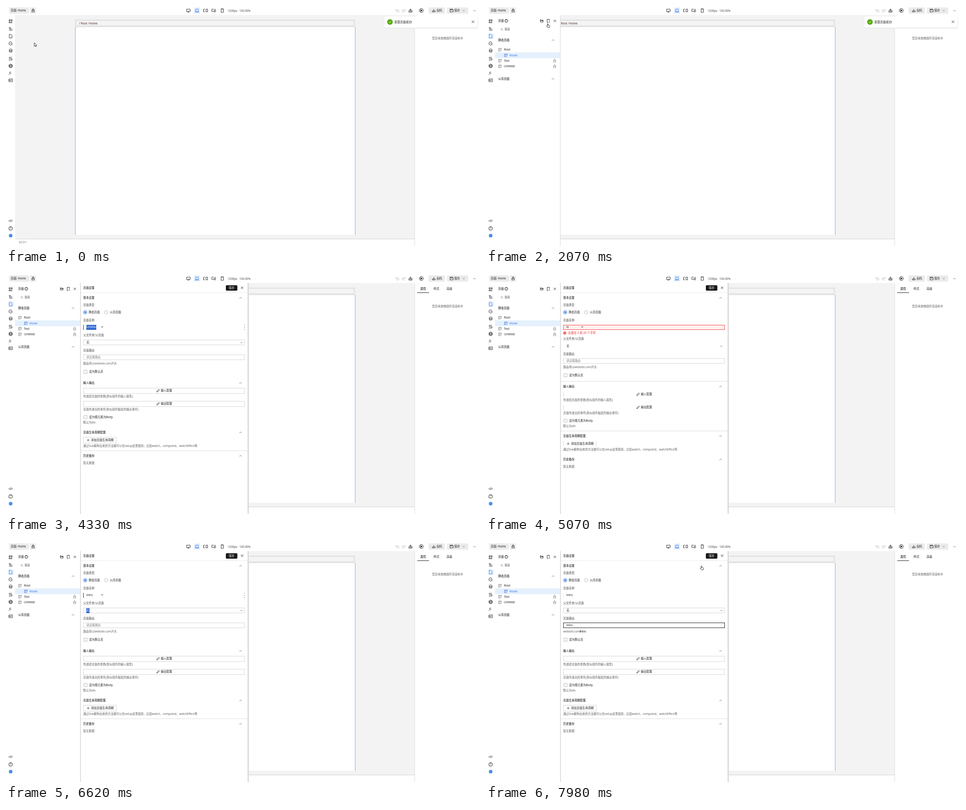
An HTML page for the animation above (8 s loop, 1050 px wide and 533 px high).

```html
<!DOCTYPE html>
<html>
<head>
<meta charset="utf-8">
<title>Page settings</title>
<style>
html, body { margin: 0; width: 100%; height: 100%; overflow: hidden; background: #fff; }
svg { display: block; width: 1050px; height: 533px; }
text { font: 6.25px "Noto Sans", "Noto Sans CJK SC", "Noto Sans CJK", sans-serif; white-space: pre; }
rect, .rule { shape-rendering: crispEdges; }
.round { shape-rendering: auto; }
.shifted .soft { stroke: none; }
.shifted .resting, :not(.shifted) > .moved { display: none; }
</style>
</head>
<body>
<script>
const NS = 'http://www.w3.org/2000/svg';
const INK = '#1c1c1c', BLUE = '#2f74e8', PALE = '#e5f0fd', LINE = '#d6d6d6', MUTED = '#444', HINT = '#5c5c5c',
  RED = '#f24a4a', SELECT = '#2c66cf';

function el(parent, tag, attrs = {}, content) {
  const node = document.createElementNS(NS, tag);
  for (const key in attrs) node.setAttribute(key, attrs[key]);
  if (content) node.textContent = content;
  return parent.appendChild(node);
}
const group = parent => el(parent, 'g');
const rect = (p, x, y, width, height, fill, more) => el(p, 'rect', { x, y, width, height, fill, ...more });
const pill = (p, x, y, w, h, fill, rx = 2) => rect(p, x, y, w, h, fill, { rx, class: 'round' });
const circle = (p, cx, cy, r, fill, stroke = 'none') => el(p, 'circle', { cx, cy, r, fill, stroke });
// y is the middle of the line of text
const label = (p, x, y, content, fill = INK, weight = 400) =>
  el(p, 'text', { x, y: y + 2.3, fill, 'font-weight': weight }, content);
const title = (p, x, y, content) => label(p, x, y, content, '#000', 700);
const icon = (p, x, y, d, stroke = INK, fill = 'none') =>
  el(p, 'path', { d, stroke, fill, 'stroke-width': 0.9, transform: `translate(${x} ${y})` });
const frame = (p, x, y, w, h, stroke = LINE) =>
  rect(p, x + .5, y + .5, w, h, '#fff', { stroke, rx: 1, class: 'soft' });
const edge = (p, x, y, stroke, dash = 'none') =>
  el(p, 'path', { d: `M${x + .5} ${y}v11`, stroke, 'stroke-dasharray': dash, class: 'rule' });
const show = (node, on) => node.setAttribute('visibility', on ? 'visible' : 'hidden');

const PAGE = 'M-3-4h4l2 2v6h-6z', UP = 'M-2.5 1.2L0-1.3 2.5 1.2', DOWN = 'M-2.5-1.2L0 1.3 2.5-1.2',
  CROSS = 'M-2.5-2.5l5 5M2.5-2.5l-5 5', LOCK = 'M-2.5-.5h5v3.5h-5zM-1.5-.5v-1.5a1.5 1.5 0 0 1 3 0v1.5',
  SCREEN = 'M-4-3h8v5h-8zM-2 3.5h4', NOTE = 'M-3-3h6v4l-2 2h-4zM-1.5-1h3M-1.5 1h1.5',
  DISK = 'M-3.5-3h6l1 1v5h-7zM-1.5-3v2h3v-2', PENCIL = 'M-3 3l.5-2L1.5-3 3-1.5-1 2.5z';

const svg = el(document.body, 'svg', { viewBox: '0 0 1050 533' });

function drawCanvas(p) {
  rect(p, 0, 0, 1050, 533, '#fff');
  rect(p, 20, 20, 885, 498, '#f3f3f3');
  rect(p, 153, 30, 620, 17, '#e4e4e4');
  pill(p, 156, 33, 614, 10, '#f4f4f4', 3);
  [[162, '/'], [166, 'Root'], [181.5, '/'], [185, 'Home']].forEach(([x, s]) => label(p, x, 38.5, s, '#4a2222'));
  rect(p, 153, 47, 620, 461, '#fff');
  el(p, 'path', { d: 'M153.5 47V508M773.5 47V508', stroke: '#3c86f2', 'stroke-dasharray': '2 1', class: 'rule' });
  rect(p, 20, 517, 885, 1, '#d4d4d4');
  label(p, 28.5, 525, 'BODY', '#888');
}

function drawToolbar(p) {
  pill(p, 7, 3, 44, 14, '#ebebeb');
  label(p, 10.5, 10, '页面: Home');
  pill(p, 53, 3, 13.5, 14, '#ebebeb');
  icon(p, 60, 10, LOCK);
  pill(p, 416, 3, 14, 14, PALE);
  icon(p, 404, 10, SCREEN);
  icon(p, 423, 10, 'M-3-3h6v5h-6zM-4.5 3.5h9', BLUE);
  icon(p, 442, 10, 'M-1.5-3h-3v6h3M1-3h3.5v6H1z');
  icon(p, 460, 10, 'M0-3h-4v5h4M1-1h3v4H1zM2-3h2');
  icon(p, 479, 10, 'M-2.5-4h5v8h-5zM-1-2.5h2');
  label(p, 491, 10.5, '1200px', MUTED);
  label(p, 517, 10.5, '100.00%', MUTED);
  icon(p, 867, 10, 'M-2-3l-2 2 2 2M-4-1h7v4h-6', '#bbb');
  icon(p, 881, 10, 'M2-3l2 2-2 2M4-1h-7v4h6', '#bbb');
  icon(p, 896, 10, 'M-3.5 0h7v3.5h-7zM-1 0v-3h2v3M-1 3.5v-2M1 3.5v-2');
  circle(p, 920, 10, 4.3, 'none', INK);
  icon(p, 920, 10, 'M-1.3-2L2 0-1.3 2z', INK, INK);
  pill(p, 936, 3, 36, 14, '#ebebeb');
  icon(p, 947.5, 10, 'M-3 0v3h6V0M0-3v4M-1.5 0L0 1.5 1.5 0');
  label(p, 953.5, 10, '出码');
  pill(p, 977, 3, 47, 14, '#ebebeb');
  icon(p, 987, 10, DISK);
  label(p, 993, 10, '保存');
  icon(p, 1014, 10, DOWN, '#777');
  [-2, 0, 2].forEach(dx => circle(p, 1038 + dx, 10.5, .6, INK));
}

function drawRail(p) {
  const cylinder = 'M-3-2.5c0-1.5 6-1.5 6 0v5c0 1.5-6 1.5-6 0zM-3-1c2 1 4 1 6 0M-3 1c2 1 4 1 6 0';
  [[34, 'M-3.5-3.5h2.5v2.5h-2.5zM1-3.5h2.5v2.5H1zM-3.5 1h2.5v2.5h-2.5zM3.5 1H1v2.5h2.5'],
   [51, 'M-4-3h5M-2 0h6M-2 3h6M-2-3v6'], [67, PAGE],
   [83, 'M3-2L0-4l-3.5 2v4L0 4l3.5-2V0M-1 0h4'], [99, cylinder],
   [117, 'M-3-3h6M-3 0h6v3h-7M-3-3v3'],
   [133, 'M-4 0a4 4 0 1 0 8 0a4 4 0 1 0-8 0M-4 0h8M0-4c-2.5 2-2.5 6 0 8M0-4c2.5 2 2.5 6 0 8'],
   [165, 'M-4-3h8v6h-8zM-2.5 1V-1L-1 1l1.5-2L2 1'],
   [477, 'M-2-2l-2 2 2 2M2-2l2 2-2 2M.8-3l-1.6 6']].forEach(([y, d]) => icon(p, 10.3, y, d));
  label(p, 6.5, 149, 'JS', INK, 600);
  circle(p, 10.3, 494, 4, 'none', INK);
  label(p, 8.8, 494, '?');
  circle(p, 10.3, 510, 4, '#4a8df0');
}

function drawInspector(p) {
  rect(p, 905, 20, 1, 513, '#dedede');
  label(p, 918, 33, '属性', '#000', 600);
  label(p, 947, 33, '样式');
  label(p, 976, 33, '高级');
  rect(p, 911, 41, 26, 1, '#222');
  label(p, 944, 72, '您还未拖拽组件至画布中', HINT);
}

function drawToast(p) {
  pill(p, 837, 24, 209, 26, '#e9e9e9', 3);
  pill(p, 838, 23.5, 207, 24.5, '#fff', 2);
  circle(p, 850.5, 35.5, 6.2, '#55ad0c');
  icon(p, 850.5, 35.5, 'M-2.8 0l2 2 3.5-3.8', '#fff');
  label(p, 860.5, 36, '新建页面成功!');
  icon(p, 1034.5, 35, CROSS);
}

function drawPages(p) {
  pill(p, 5, 60.5, 12, 13, PALE);
  icon(p, 10.3, 67, PAGE, BLUE);
  rect(p, 20, 20, 145, 513, '#fff');
  rect(p, 164, 20, 1, 513, '#d8d8d8');
  title(p, 27, 33, '页面');
  circle(p, 45, 33, 3.3, 'none', INK);
  label(p, 43.6, 33, '?');
  icon(p, 123.5, 33, 'M-3-2.5h2l1 1h3v4h-6zM-3-.5h6');
  icon(p, 138, 33, 'M2.5 0v-3.5h-5v7H0M1 2.5h3');
  icon(p, 152.5, 33, CROSS);
  icon(p, 35, 51.5, 'M2 0a2 2 0 1 0-4 0a2 2 0 1 0 4 0M1.5 1.5L3 3', '#999');
  label(p, 41, 51.5, '搜索', HINT);
  [[76, '静态页面'], [162, '公共页面']].forEach(([y, s]) => {
    title(p, 27, y, s);
    icon(p, 148.5, y, UP, '#666');
  });
  rect(p, 20, 103, 144, 13, PALE);
  [[97, 'Root'], [121.5, 'Test', true], [134, 'Untitled', true]].forEach(([y, s, locked]) => {
    icon(p, 31, y, NOTE, '#777');
    label(p, 40, y, s);
    if (locked) icon(p, 152, y, LOCK, '#888');
  });
  icon(p, 44, 109.5, NOTE, BLUE);
  label(p, 52, 109.5, 'Home', BLUE);
}

function section(p, y, name) {
  title(p, 171, y, name);
  icon(p, 519.5, y, UP, '#666');
}
function checkbox(p, y, name) {
  frame(p, 172, y - 4, 7, 7, '#bbb').classList.remove('soft');
  label(p, 184, y, name);
}

function drawSettings(p) {
  rect(p, 165, 20, 370, 513, '#fff');
  rect(p, 164, 20, 2, 513, '#dedede');
  rect(p, 535, 20, 3, 513, '#dcdcdc');
  title(p, 171, 30.5, '页面设置');
  pill(p, 487, 25, 25.5, 12, '#191919');
  label(p, 493.5, 30.7, '保存', '#fff');
  icon(p, 523, 30.5, CROSS);
  rect(p, 165, 41, 370, 1, '#ececec');
  section(p, 53, '基本设置');
  label(p, 171, 69, '页面类型', MUTED);
  circle(p, 175.5, 85, 3.8, '#fff', BLUE);
  circle(p, 175.5, 85, 2, BLUE);
  label(p, 183, 85, '静态页面');
  circle(p, 222, 85, 3.8, '#fff', '#bbb');
  label(p, 230, 85, '公共页面');
  label(p, 171, 103, '页面名称', MUTED);
}

function drawLower(p) {
  label(p, 171, 136, '父文件夹/父页面', MUTED);
  frame(p, 171, 146, 357, 11);
  icon(p, 521.5, 152.3, DOWN, '#666');
  label(p, 171, 170, '页面路由', MUTED);
  checkbox(p, 217, '设为默认页');
  [[230, 'moved'], [340, 'moved'], [392, 'resting']].forEach(([y, name]) =>
    rect(p, 165, y, 370, 1, '#dedede', { class: name }));
  section(p, 242, '输入输出');
  [[259, '输入配置'], [288, '输出配置']].forEach(([y, s]) => {
    frame(p, 171, y - 6, 357, 12);
    edge(p, 171, y - 5, LINE);
    icon(p, 337, y, PENCIL);
    label(p, 343, y, s, INK, 500);
  });
  label(p, 171, 272, '传递给页面的参数(类似组件的输入属性)', HINT);
  label(p, 171, 301, '页面传递出的事件(类似组件触发的输出事件)', HINT);
  checkbox(p, 317.5, '设为根元素为Body');
  label(p, 171, 330, '默认为div', HINT);
  section(p, 352, '页面生命周期配置');
  frame(p, 171, 362, 73, 13);
  [171, 244].forEach(x => edge(p, x, 363, LINE));
  icon(p, 182, 369, 'M-3 0h6M0-3v6', '#555');
  label(p, 188.5, 369, '添加页面生命周期');
  label(p, 171, 382, '通过Vue解构出来的方法都可以在setup这里使用，比如watch、computed、watchEffect等', HINT);
  section(p, 404, '历史备份');
  label(p, 171, 419.5, '暂无数据', HINT);
}

drawCanvas(svg);
drawToolbar(svg);
rect(svg, 0, 20, 20, 513, '#fff');
drawRail(svg);
drawInspector(svg);
const pages = group(svg);
drawPages(pages);
const settings = group(svg);
drawSettings(settings);

const nameBox = rect(settings, 171.5, 113.5, 357, 10, '#fff0ee', { rx: 1, stroke: RED });
const nameEdges = [edge(settings, 171, 113, LINE), edge(settings, 528, 113, LINE, '1 4')];
const nameSelection = rect(settings, 178, 113, 13, 11, SELECT);
const nameText = label(settings, 178, 118, 'Untitled');
const caret = rect(settings, 184, 115, 1, 7, INK);

const error = group(settings);
circle(error, 174.5, 131, 3.2, RED);
icon(error, 174.5, 131, 'M-1.1-1.1l2.2 2.2M1.1-1.1l-2.2 2.2', '#fff');
label(error, 182, 131, '长度在 3 到 25 个字符', '#f02020');

const lower = group(settings);
drawLower(lower);
const parentSelection = rect(lower, 178, 147, 7, 11, SELECT);
const parentText = label(lower, 178.3, 152, '无');
const routeBox = frame(lower, 171, 179, 357, 11);
routeBox.classList.remove('soft');
const routeText = label(lower, 178, 185, '');
const routeHint = label(lower, 171, 199, '', HINT);
const routeSlug = label(lower, 207.5, 199, 'intro', '#000', 600);

const toast = group(svg);
drawToast(toast);

const clickSpot = circle(svg, 212, 113.5, 6, '#fff04a');
clickSpot.setAttribute('opacity', .85);
const pointer = group(svg);
const arrow = icon(pointer, 0, 0, 'M.5.5v8l2-1.6 1.3 2.4 1.2-.6-1.2-2.4 2.4-.3z', '#222', '#fff');
const hand = icon(pointer, 0, 0, 'M2 6V1q.8-1 1.6 0v3l3 .7q.9.3.7 1.5L6.5 9.5H3L.3 6q.5-1 1.7 0z', '#222', '#fff');
const dash = rect(pointer, -1, 2, 4, 1, INK);

const pointerPath = [[0, 62, 81], [840, 14, 66], [1040, 14, 66], [2000, 134, 38.5], [2300, 134, 38.5],
  [2540, 126, 51], [3100, 212, 115], [7330, 212, 115], [7980, 474.5, 52.5]];
const names = [[0, 'Untitled'], [4400, 'i'], [4540, 'in'], [5270, 'int'], [5340, 'intr'], [5410, 'intro']];

const clamp = v => Math.max(0, Math.min(1, v));
const ramp = (t, from, to) => clamp((t - from) / (to - from));
const within = (t, from, to) => t >= from && t < to;

function pointerAt(t) {
  const i = pointerPath.findIndex(key => key[0] > t);
  if (i < 0) return pointerPath[pointerPath.length - 1].slice(1);
  const [t0, x0, y0] = pointerPath[i - 1], [t1, x1, y1] = pointerPath[i];
  const k = ramp(t, t0, t1), e = k * k * (3 - 2 * k);
  return [x0 + (x1 - x0) * e, y0 + (y1 - y0) * e];
}

function render(t) {
  pages.style.display = t >= 970 ? '' : 'none';
  settings.style.display = t >= 2400 ? '' : 'none';
  show(toast, t < 3780);

  const invalid = within(t, 4400, 5270);
  const nameFocused = within(t, 3150, 6690);
  const nameSelected = within(t, 4330, 4400) || within(t, 6020, 6620);
  show(nameBox, invalid);
  nameEdges.forEach(node => {
    show(node, !invalid);
    node.setAttribute('stroke', nameFocused ? '#222' : '#e8e8e8');
  });
  show(nameSelection, nameSelected);
  nameSelection.setAttribute('width', t < 5000 ? 22 : 13);
  nameText.textContent = names.filter(([start]) => t >= start).pop()[1];
  nameText.setAttribute('fill', nameSelected ? '#fff' : INK);
  show(caret, within(t, 4540, 5070));

  error.setAttribute('opacity', ramp(t, 4400, 4610) - ramp(t, 5270, 5480));
  const shift = Math.round(8 * (ramp(t, 4400, 4610) - ramp(t, 5480, 5620)));
  lower.setAttribute('transform', `translate(0 ${shift})`);
  lower.classList.toggle('shifted', shift > 4);

  const parentSelected = within(t, 6620, 6890), filled = t >= 7290;
  show(parentSelection, parentSelected);
  parentText.setAttribute('fill', parentSelected ? '#fff' : INK);
  routeBox.setAttribute('stroke', t >= 6890 ? '#222' : LINE);
  routeText.textContent = filled ? 'intro' : '请设置路由';
  routeText.setAttribute('fill', filled ? INK : '#777');
  routeHint.textContent = filled ? 'website.com/' : '路由将以website.com开头';
  routeSlug.style.display = filled ? '' : 'none';

  show(clickSpot, within(t, 3100, 3450));
  const [x, y] = pointerAt(Math.floor(t / 70) * 70);
  pointer.setAttribute('transform', `translate(${x} ${y})`);
  const typing = within(t, 3100, 7400);
  const pointing = within(t, 770, 1110) || within(t, 1900, 2400) || t >= 7840;
  show(dash, typing);
  show(hand, pointing);
  show(arrow, !typing && !pointing);
}

const start = performance.now();
function tick() {
  render((performance.now() - start) % 8000);
  requestAnimationFrame(tick);
}
tick();
</script>
</body>
</html>
```
